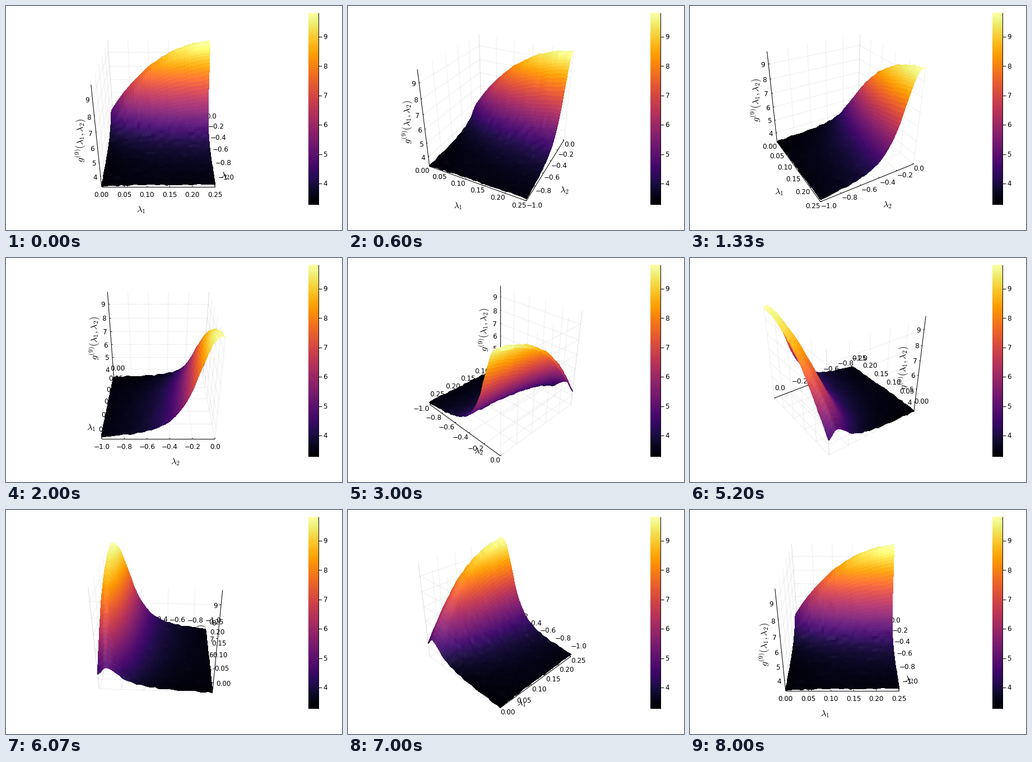
These frames come from a looping animation (600 by 400 pixels, 8070 ms). A matplotlib script:

```python
import numpy as np
import matplotlib.pyplot as plt
from matplotlib.animation import FuncAnimation
from matplotlib.collections import LineCollection, PolyCollection

W, H, DPI = 600, 400, 100
FRAMES, INTERVAL = 269, 30
STEP_MS, STEPS = 200 / 3, 120       # the camera turns 3 degrees, 15 times a second
PX = 72 / DPI                       # points per pixel
CENTER = np.array([272.0, 184.4])
HALF = 171.6
FOV, ELEV = np.radians(30), np.radians(30)
DIST = np.sqrt(3) / np.sin(FOV / 2)
Z_LO, Z_HI = 3.26, 9.805

plt.rcParams["font.family"] = "DejaVu Sans"
plt.rcParams["mathtext.fontset"] = "cm"


def project(p, az):
    """Perspective view of points in the [-1, 1] cube: screen position, depth."""
    p = np.asarray(p, float)
    x, y, z = p[..., 0], p[..., 1], p[..., 2]
    right = x * np.cos(az) + y * np.sin(az)
    near = x * np.sin(az) - y * np.cos(az)
    up = -near * np.sin(ELEV) + z * np.cos(ELEV)
    depth = DIST - near * np.cos(ELEV) - z * np.sin(ELEV)
    k = HALF / np.tan(FOV / 2) / depth
    return CENTER + np.stack([right * k, -up * k], -1), depth


def resample(a, pos):
    """Linear interpolation of the rows of a at positions in 0..1."""
    src = np.linspace(0, 1, len(a))
    return np.array([np.interp(pos, src, col) for col in a.T]).T


def build_surface(rows=66, cols=36):
    q = np.linspace(0, 1, cols)[None, :]
    s = 2 * np.linspace(0, 1, rows)[:, None] ** 1.6     # distance from the high side
    amp = 0.48 + 1.25 * (1 - (1 - q) ** 2.3) + 0.26 * q
    t = s - (0.05 + 0.1 * (1 - q) ** 2)
    t = np.where(t < 0, -t * (0.8 + 0.65 * (1 - q) ** 3), t)
    z = amp / (1 + (t / (0.33 + 0.08 * q)) ** (1.9 + 0.35 * q)) - 1

    rough = np.random.default_rng(4).normal(0, 0.011, (33, 29))
    rough = resample(resample(rough, s[:, 0] / 2).T, q[0]).T
    z = np.clip(z + rough, -1, 1)
    return np.stack(np.broadcast_arrays(2 * q - 1, 1 - s, z), -1)


def corners(a):
    quad = np.stack([a[:-1, :-1], a[1:, :-1], a[1:, 1:], a[:-1, 1:]], 2)
    return quad.reshape(-1, *quad.shape[2:])


surface = build_surface()
quads = corners(surface)
quad_color = plt.get_cmap("inferno")((quads[..., 2].mean(1) + 1) / 2)[:, :3]
normals = np.cross(quads[:, 2] - quads[:, 0], quads[:, 3] - quads[:, 1])
normals /= np.linalg.norm(normals, axis=1, keepdims=True)


def shade(az):
    """Soft highlight where the upper side faces the camera."""
    view = np.array([np.sin(az) * np.cos(ELEV), -np.cos(az) * np.cos(ELEV),
                     np.sin(ELEV)])
    facing = np.clip(normals @ view, 0, 1)
    return np.clip(quad_color + 0.08 * facing[:, None] ** 8, 0, 1)


# Tick values scaled to the cube
x_vals = np.arange(6) * 0.05
y_vals = np.arange(-5, 1) * 0.2
z_vals = np.arange(4, 10)
x_pos, y_pos = x_vals * 8 - 1, y_vals * 2 + 1
z_pos = 2 * (z_vals - Z_LO) / (Z_HI - Z_LO) - 1

ticks = {
    "x": np.array([(v, -1, -1) for v in x_pos]),
    "y": np.array([(1, v, -1) for v in y_pos]),
    "z": np.array([(-1, -1, v) for v in z_pos]),
}
names = {
    "x": [f"{v:.2f}" for v in x_vals],
    "y": [f"{v:.1f}".replace("-", "\u2212") for v in y_vals],
    "z": [str(v) for v in z_vals],
}

grid = []
for v in x_pos:
    grid += [[(v, -1, -1), (v, 1, -1)], [(v, 1, -1), (v, 1, 1)]]
for v in y_pos:
    grid += [[(1, v, -1), (-1, v, -1)], [(-1, v, -1), (-1, v, 1)]]
for v in z_pos:
    grid += [[(-1, -1, v), (-1, 1, v)], [(-1, 1, v), (1, 1, v)]]

edges = [[(-1, -1, -1), (1, -1, -1)],
         [(1, -1, -1), (1, 1, -1)],
         [(-1, -1, -1), (-1, -1, 1)]]
inward = {"x": (0, 0.024, 0), "y": (-0.024, 0, 0), "z": (0, 0.024, 0)}
for key, pts in ticks.items():
    edges += [[p, p + inward[key]] for p in pts]
grid, edges = np.array(grid), np.array([[tuple(a), tuple(b)] for a, b in edges])

fig = plt.figure(figsize=(W / DPI, H / DPI), dpi=DPI, facecolor="white")
ax = fig.add_axes([0, 0, 1, 1])

# Colour bar
ax.imshow(np.linspace(1, 0, 256)[:, None], cmap="inferno", aspect="auto",
          extent=(540, 558, 355, 12), interpolation="bilinear")
ax.set_xlim(0, W)
ax.set_ylim(H, 0)
ax.axis("off")


def label(text, x=0, y=0, ha="left"):
    return ax.text(x, y, text, fontsize=12 * PX, ha=ha, va="baseline", zorder=3)


BASE = 4.4      # from the middle of a digit to its baseline
bar = [[(558, 12), (558, 355)]]
for v in z_vals:
    y = 316.9 - 52.4 * (v - 4)
    bar.append([(558, y), (564, y)])
    label(str(v), 566.5, y + BASE)
ax.add_collection(LineCollection(bar, colors="black", linewidths=PX))

grid_lines = ax.add_collection(
    LineCollection([], colors=(0, 0, 0, 0.07), linewidths=PX, zorder=1))
axis_lines = ax.add_collection(
    LineCollection([], colors="black", linewidths=PX, zorder=2))
mesh = ax.add_collection(
    PolyCollection([], linewidths=0.4, antialiaseds=False, zorder=5))
mesh.set_snap(False)

tick_text = {k: [label(s) for s in names[k]] for k in "xyz"}


def guide(text, rotation=0):
    return ax.text(0, 0, text, fontsize=16.5 * PX, rotation=rotation,
                   ha="center", va="center", zorder=4)


guides = [
    (guide(r"$\lambda_1$"), (0, -1, -1), (-30.5, 41.5)),
    (guide(r"$\lambda_2$"), (1, 0, -1), (30.5, 41.5)),
    (guide(r"$g^{(9)}(\lambda_1,\lambda_2)$", 90), (-1, -1, 0), (-29.5, 0.5)),
]


def label_offset(pts, floor):
    """Alignment and shift of tick labels from the outward normal of their axis."""
    d = pts[-1] - pts[0]
    n = np.array([-d[1], d[0]]) / np.hypot(*d)
    if n @ (pts.mean(0) - floor) < 0:
        n = -n
    nx, ny = n
    if ny > 0:
        if abs(nx) < 0.01:
            return "center", 0, 14
        return ("left", 0.5, 7.5) if nx > 0 else ("right", 0, 7.5)
    return "left", 7 * nx ** 9, -16.3 - 2.5 * abs(ny)


def update(i):
    # Latest camera step that begins within this time slot
    step = min(int(((i + 1) * INTERVAL - 0.01) / STEP_MS), STEPS)
    az = np.radians(3 * step)
    grid_lines.set_segments(project(grid, az)[0])
    axis_lines.set_segments(project(edges, az)[0])

    floor = project((0, 0, -1), az)[0]
    for key, texts in tick_text.items():
        pts = project(ticks[key], az)[0]
        if key == "z":
            ha, dx, dy = "right", -6, 1
        else:
            ha, dx, dy = label_offset(pts, floor)
        for t, (x, y) in zip(texts, pts):
            t.set_ha(ha)
            t.set_position((x + dx, y + dy + BASE))

    for t, anchor, shift in guides:
        t.set_position(project(anchor, az)[0] + shift)

    xy, depth = project(surface, az)
    order = np.argsort(-corners(depth).mean(1))
    color = shade(az)[order]
    mesh.set_verts(corners(xy)[order])
    mesh.set_facecolor(color)
    mesh.set_edgecolor(color)
    return []


anim = FuncAnimation(fig, update, frames=FRAMES, interval=INTERVAL,
                     init_func=lambda: update(0), repeat=True, repeat_delay=0,
                     blit=False)
plt.show()
```
